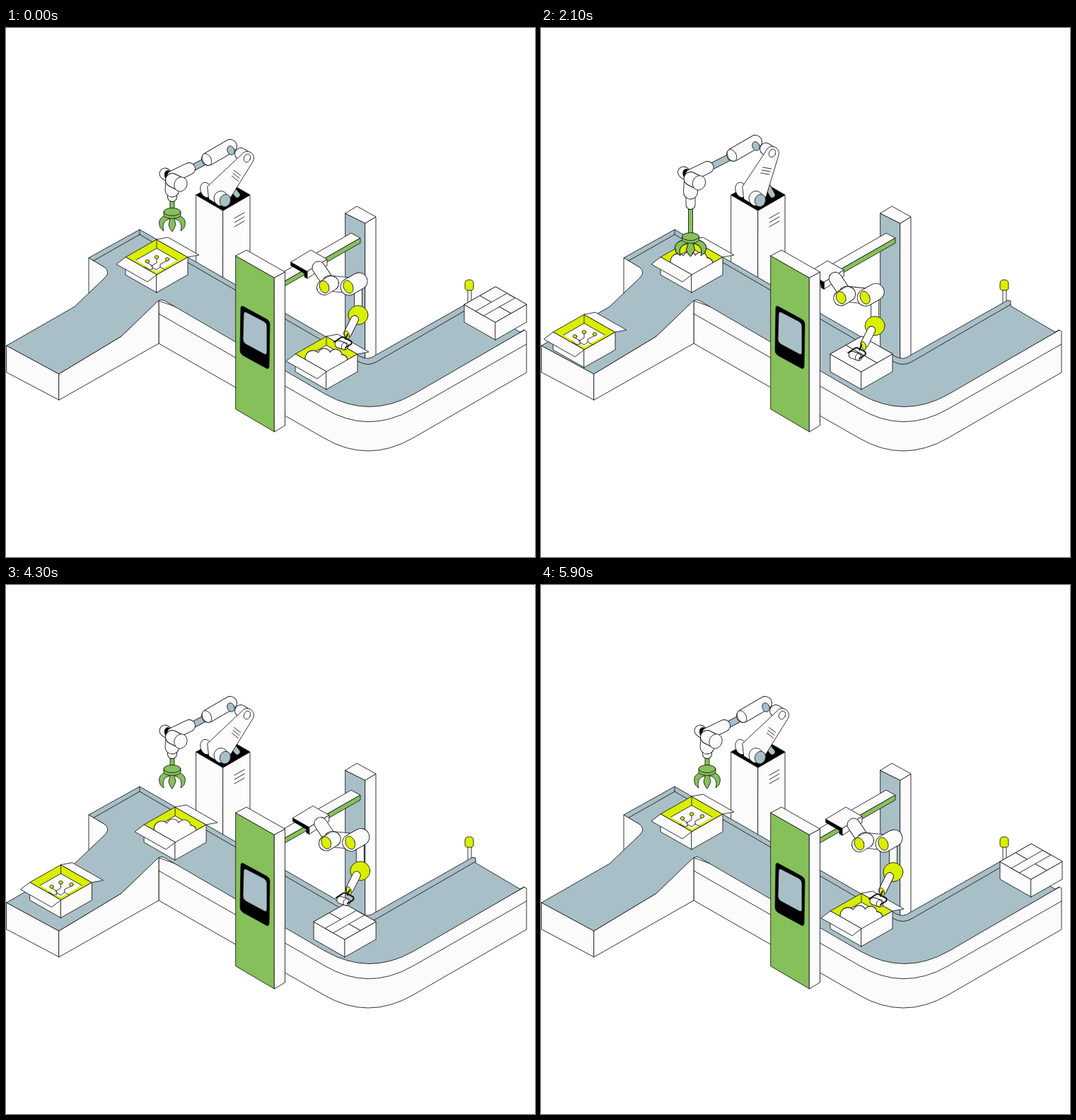
These frames come from a looping animation (748 px wide and 748 px high, 6000 ms). An HTML page with a canvas:

```html
<!DOCTYPE html>
<html lang="en">
<head>
<meta charset="utf-8">
<title>Packing line</title>
<style>
  html, body { margin: 0; width: 100%; height: 100%; overflow: hidden; background: #fff; }
  canvas { display: block; width: 748px; height: 748px; }
</style>
</head>
<body>
<canvas id="stage"></canvas>
<script>
const SIZE = 748, LOOP = 6000, STEP = 100;
const INK = '#111', WHITE = '#fbfbfb', BLUE = '#a9bfc7', GREEN = '#86c05a', LIME = '#d9ee00';

const canvas = document.getElementById('stage');
const ctx = canvas.getContext('2d');
const dpr = window.devicePixelRatio || 1;
canvas.width = canvas.height = SIZE * dpr;

const mix = (a, b, k) => a + (b - a) * k;
const clamp = (v, lo, hi) => Math.min(hi, Math.max(lo, v));
const ease = (t, from, to) => {
  const k = clamp((t - from) / (to - from), 0, 1);
  return k * k * (3 - 2 * k);
};

// ---- drawing helpers ----
function shape(d, fill) {
  const p = new Path2D(d);
  if (fill) { ctx.fillStyle = fill; ctx.fill(p); }
  ctx.stroke(p);
}
const outline = points => 'M' + points.map(p => p.join(' ')).join('L') + 'Z';
const poly = (points, fill) => shape(outline(points), fill);
function oval(x, y, rx, ry, fill, turn = 0) {
  ctx.beginPath();
  ctx.ellipse(x, y, rx, ry, turn, 0, Math.PI * 2);
  ctx.fillStyle = fill;
  ctx.fill();
  ctx.stroke();
}
function tube(x1, y1, x2, y2, r, fill = WHITE, cap = 'round') {
  ctx.save();
  ctx.lineCap = cap;
  for (const [color, width] of [[INK, 2 * r + .85], [fill, 2 * r - .85]]) {
    ctx.strokeStyle = color;
    ctx.lineWidth = width;
    ctx.beginPath();
    ctx.moveTo(x1, y1);
    ctx.lineTo(x2, y2);
    ctx.stroke();
  }
  ctx.restore();
}
function at(x, y, draw) {
  ctx.save();
  ctx.translate(x, y);
  draw();
  ctx.restore();
}
function clipTo(points, draw) {
  ctx.save();
  ctx.clip(new Path2D(outline(points)));
  draw();
  ctx.restore();
}

// ---- scenery ----
function tower() {
  shape('M269 236L307 258V360H269Z', WHITE);
  shape('M307 258L345 236V380H307Z', WHITE);
  shape('M269 236L307 214L345 236L307 258Z', '#000');
  shape('M323 269l14-8M323 275l14-8M323 281l14-8');
}
function post() {
  shape('M480 262L508 276V480L480 465Z', BLUE);
  shape('M508 276L523 267V470L508 480Z', WHITE);
  shape('M480 262L496 252L523 267L508 276Z', WHITE);
}
function lamp() {
  shape('M653 369V392H658V369Z', WHITE);
  shape('M649 361Q649 356 655 356Q661 356 661 361V368Q661 371 655 371Q649 371 649 368Z', LIME);
}
function belt() {
  // outer walls
  shape('M216 386V446L450 580Q512 616 575 580L736 487V429L733 427L576 517Z', WHITE);
  shape('M1 449L75 489V526L1 487Z', WHITE);
  shape('M75 489L163 436L216 384V446L75 526Z', WHITE);
  shape('M117 325V375L150 345Z', WHITE);
  // running surface
  shape('M1 449L97 394L140 353Q148 345 139 338L117 325L189 285L500 464Q512 471 522 463' +
    'L660 385L664 386V393L727 430L733 427L576 518Q514 553 452 518L225 386Q218 382 213 388L163 436L75 489Z', BLUE);
  shape('M124 329L189 292L499 472Q512 479 524 472L664 391M189 285V292');
  shape('M216 404L450 538Q512 575 575 539L736 447');
}
function panel() {
  shape('M325 322L379.5 353V571L325 539Z', GREEN);
  shape('M379.5 353L394.5 345V562L379.5 571Z', WHITE);
  shape('M325 322L340 314L394.5 345L379.5 353Z', WHITE);
  shape('M332 396Q332 392 336 394L369 412Q373 414 373 419L372 478Q372 483 368 481L335 463Q331 460 331 456Z', '#000');
  shape('M336 405Q336 400 340 402L365 415Q369 418 369 422V458Q369 463 365 461L339 447Q335 444 335 440Z', BLUE);
}

// ---- boxes ----
function cloud(x, y, w, h) {
  const puffs = [[-19, 6, 11], [-3, 1, 9], [13, 2, 9], [22, 9, 8], [0, 15, 18],
    [-16, 22, 10], [4, 27, 10], [17, 20, 9]];
  at(x, y, () => {
    ctx.scale(w, h);
    for (const [color, grow] of [[INK, .45], ['#fff', -.45]]) {
      ctx.fillStyle = color;
      for (const [px, py, r] of puffs) {
        ctx.beginPath();
        ctx.arc(px, py, r + grow / Math.max(w, .1), 0, Math.PI * 2);
        ctx.fill();
      }
    }
  });
}
function circuit(x, y) {
  at(x, y, () => {
    shape('M-13 8L-6 12V17M0 2V8L-8 13M15 5L5 10V15');
    shape('M-17 14L-9 18L-5 15L0 18L5 14L12 18', '#fff');
    for (const [px, py] of [[-13, 6], [0, 0], [15, 3]]) oval(px, py, 2.8, 2.3, LIME);
  });
}

// Offset of a flap's free edge while it swings from open, over the top, to shut.
const swing = (open, shut, k) => [0, 1].map(i =>
  (1 - k) ** 2 * open[i] + 2 * k * (1 - k) * (i ? -38 : 0) + k * k * shut[i]);

function box(x, y, { tilt = 0, left = 0, right = 0, tape = 0, fill = null } = {}) {
  const u = [44, -25 - 10 * tilt], v = [-44, -25], h = [-6 * tilt, -25 + 2 * tilt];
  const P = (a, b, c) => [x + a * u[0] + b * v[0] + c * h[0], y + a * u[1] + b * v[1] + c * h[1]];
  const F = P(0, 0, 1), R = P(1, 0, 1), B = P(1, 1, 1), L = P(0, 1, 1), M = P(.5, .5, 1);
  const flap = (p, q, d) => poly([p, [p[0] + d[0], p[1] + d[1]], [q[0] + d[0], q[1] + d[1]], q], WHITE);

  poly([F, R, B, L], LIME);
  clipTo([F, R, B, L], () => {
    const inset = [P(.08, .08, 1), P(1, .08, 1), B, P(.08, 1, 1)];
    clipTo(inset, () => poly([P(0, 0, .5), P(1, 0, .5), P(1, 1, .5), P(0, 1, .5)], WHITE));
    shape(`M${B}L${P(1, 1, .5)}`);
    circuit(M[0] + 4 * tilt, M[1] - 4 * tilt);
  });
  if (fill) clipTo([L, [L[0], 0], [R[0], 0], R, F], () => fill(M));
  poly([F, L, P(0, 1, 0), P(0, 0, 0)], WHITE);
  poly([F, R, P(1, 0, 0), P(0, 0, 0)], WHITE);
  flap(B, R, swing([16, -3 - 5 * tilt], [-22, 12.5], right));
  flap(F, L, swing([-13 + 4 * tilt, 10 + 7 * tilt], [22, -12.5], left));
  if (tape > 0) poly([P(0, .37, 1), P(tape, .37, 1), P(tape, .63, 1), P(0, .63, 1)], WHITE);
}

const SEALED = { left: 1, right: 1, tape: 1 };
const heap = M => cloud(M[0], M[1], 1, 1);

function boxes(t) {
  const run = ease(t, 3890, 5890);

  // arrives empty, then climbs the ramp
  const dx = 152 * run;
  const fadeIn = ease(t, 200, 700);
  if (fadeIn > 0) {
    ctx.globalAlpha = fadeIn;
    box(61 + dx, 480 - .57 * dx - .36 * clamp(dx - 72, 0, 54),
      { tilt: ease(dx, 58, 84) - ease(dx, 114, 140) });
    ctx.globalAlpha = 1;
  }

  // gets its filling from the gripper
  const drop = ease(t, 1400, 2050), grown = ease(t, 600, 1050);
  box(213 + 240 * run, 374 + 137 * run, {
    fill: grown > 0 && (M => cloud(M[0] - 1 + drop, M[1] - 48 * (1 - drop),
      grown * mix(.68, 1, drop), grown * mix(.72, 1, drop)))
  });

  // is shut and taped, then rounds the corner
  const ex = 240 * run;
  box(453 + ex, 511 + .577 * (Math.min(ex, 59.4) - Math.max(ex - 59.4, 0)), {
    left: ease(t, 500, 1300), right: ease(t, 1200, 1950), tape: ease(t, 2350, 3400), fill: heap
  });

  // leaves
  const out = 110 * ease(t, 0, 1000);
  if (out < 110) box(692 + out, 441 - .577 * out, SEALED);
}

// ---- gripper arm ----
function gripper(x, y, spread) {
  at(x, y, () => {
    ctx.save();
    ctx.scale(1 + .2 * spread, 1);
    const claw = 'M-5 2C-14 3-20 9-18 16C-18 20-15 23-12 25C-14 18-13 10-4 8Z';
    shape(claw, GREEN);
    ctx.scale(-1, 1);
    shape(claw, GREEN);
    shape('M-2 4L-5 16Q-3 22 0 26Q4 22 5 16L2 4Z', GREEN);
    ctx.restore();
    shape('M-12-2V2C-12 9 12 9 12 2V-2Z', GREEN);
    oval(0, -2, 12, 5.5, GREEN);
  });
}
function pickArm(t) {
  const k = ease(t, 0, 800) - ease(t, 3600, 4300);
  const reach = ease(t, 1400, 2050) - ease(t, 2850, 3500);
  const grip = ease(t, 700, 1100) - ease(t, 2700, 3100);
  const ex = mix(341, 327, k), ey = mix(184, 177, k);
  const sx = -14 * k, sy = -6 * k, hx = -23.5 * k, hy = -2 * k;

  tube(319, mix(226, 221, k), 327, 236, 4, BLUE);
  oval(283, 229, 8, 11, WHITE, -.3);

  // forearm
  tube(262 + hx, 199 + hy, 290 + sx, 184 + sy, 4.5, BLUE);
  tube(286 + sx, 185 + sy, 317 + sx, 167 + sy, 9.5);
  oval(284 + sx, 186 + sy, 6, 9, WHITE, -.5);
  oval(318 + sx, 173 + sy, 5, 6.5, BLUE, -.4);
  tube(ex - 9, ey - 6, ex, ey, 8.5);

  // lower link, wide at the foot
  const lean = Math.atan2(243 - ey, ex - 306);
  const nx = 9.5 * Math.sin(lean), ny = 9.5 * Math.cos(lean);
  shape(`M285 224L${ex - nx} ${ey - ny}A9.5 9.5 0 0 1 ${ex + nx} ${ey + ny}L318 239L300 250L287 242Z`, WHITE);
  oval(ex, ey, 4.5, 6, WHITE, .4);
  const mx = mix(308, ex, .62), my = mix(243, ey, .62);
  for (let i = 0; i < 3; i++) {
    const lx = mx - 6 - i * 1.5, ly = my - 5 + i * 4;
    shape(`M${lx} ${ly}l${mix(9, 12, k)} ${mix(7, 2, k)}`);
  }
  oval(304, 241, 10, 10.5, WHITE);
  oval(310, 244, 7.5, 9, BLUE, .3);

  // wrist and hand
  at(hx, hy, () => {
    const low = 37 * reach;
    tube(235, 242, 235, 258 + low, 3, GREEN, 'butt');
    tube(235, 234, 235, 239 + 13 * reach, 6.5);
    tube(225, 206, 229, 209, 8);
    oval(231, 210, 6, 9, '#000', -.5);
    tube(236, 217, 235, 229 + 5 * reach, 10);
    tube(236, 210, 259, 199, 8.5);
    tube(235, 215, 243, 219, 9.5);
    oval(247, 221, 9, 10.5, WHITE, .4);
    gripper(235, 262 + low, grip);
  });
}

// ---- taping arm ----
function rail() {
  shape('M380 352L488 290L501 297L380 366Z', WHITE);
  shape('M380 366L501 297V304L380 373Z', GREEN);
}
function tapeArm(t) {
  const s = -28 * ease(t, 900, 2350) + 50 * ease(t, 2350, 3400) - 22 * ease(t, 3600, 4500);
  const press = ease(t, 900, 2100) - ease(t, 3000, 3600);
  at(s, -.59 * s, () => {
    // carriage
    shape('M426 344L454 327V336L426 354Z', WHITE);
    shape('M403 331L426 344V354L422 352V347L403 336Z', '#000');
    shape('M403 331L431 314L454 327L426 344Z', WHITE);

    // joints
    tube(442, 339, 456, 360, 9);
    tube(458, 361, 486, 364, 11);
    tube(450, 367, 460, 361, 10.5);
    oval(450, 366, 6.5, 9, LIME, -.4);
    tube(498, 366, 498, 397, 5.5, WHITE, 'butt');
    tube(485, 366, 499, 358, 12);
    oval(484, 366, 6.5, 9.5, LIME, -.4);
    oval(498, 406, 14, 13.5, LIME);

    // tape head
    tube(493, 412, 483, 432, 5.5);
    oval(482, 434, 3.2, 6, LIME, -.3);
    at(-4 * press, 0, () => {
      tube(470, 447, 479, 450, 5, WHITE);
      oval(478, 450, 3.5, 5, WHITE, .3);
      ctx.save();
      ctx.lineWidth = 1.9;
      shape('M483 433L480 440M464 444L473 438Q476 436 479 438L487 442Q490 444 488 447L480 452');
      ctx.restore();
    });
  });
}

function draw(t) {
  ctx.setTransform(dpr, 0, 0, dpr, 0, 0);
  ctx.fillStyle = '#fff';
  ctx.fillRect(0, 0, SIZE, SIZE);
  ctx.strokeStyle = INK;
  ctx.lineWidth = .85;
  ctx.lineJoin = ctx.lineCap = 'round';
  tower();
  post();
  lamp();
  belt();
  boxes(t);
  pickArm(t);
  rail();
  tapeArm(t);
  panel();
}

const start = performance.now();
function tick() {
  const t = (performance.now() - start) % LOOP;
  draw(Math.floor(t / STEP) * STEP);
  requestAnimationFrame(tick);
}
tick();
</script>
</body>
</html>
```
